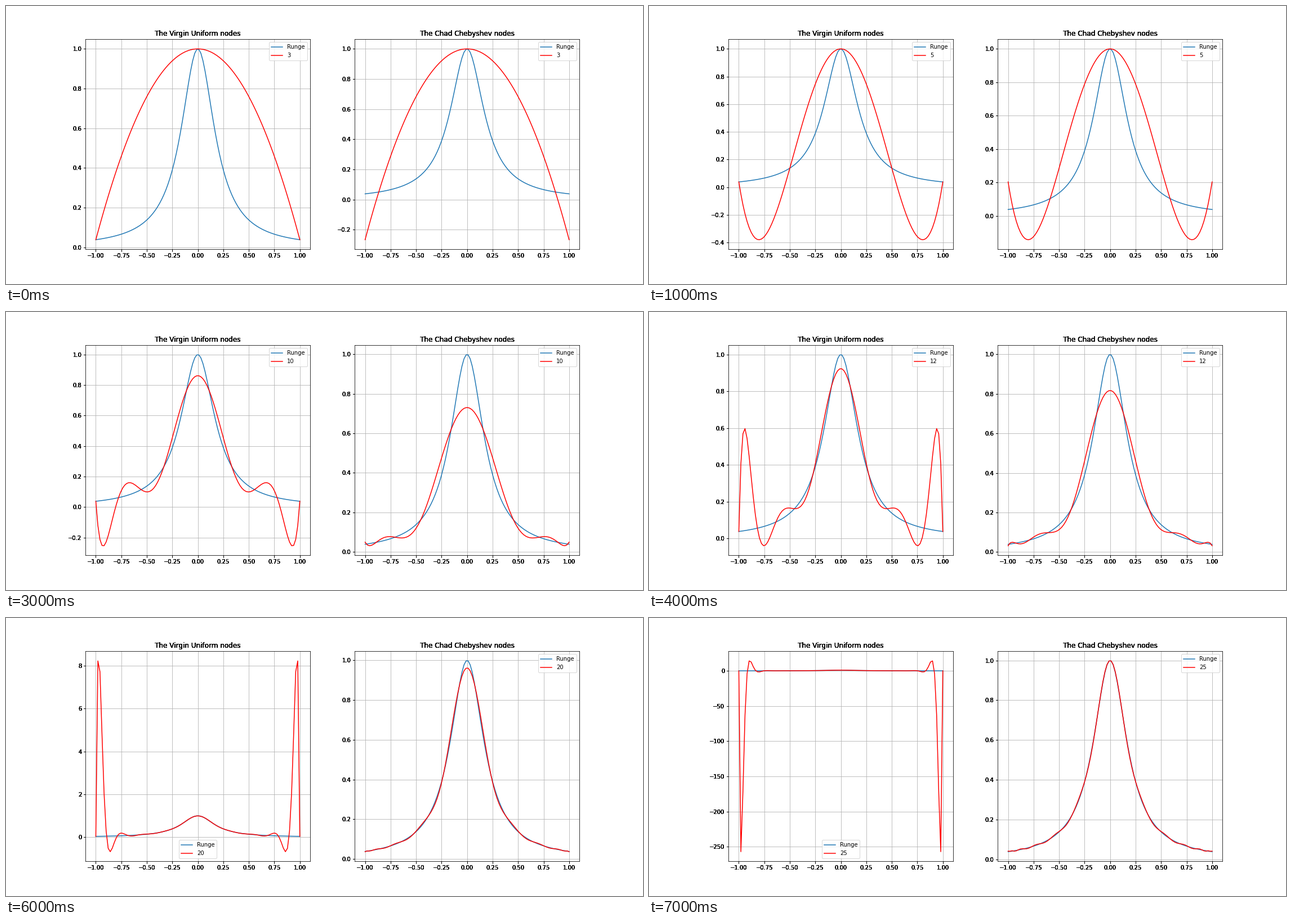
These frames come from a looping animation (1131x495 px, 8000 ms). A matplotlib script:

```python
import numpy as np
import matplotlib.pyplot as plt
from matplotlib.animation import FuncAnimation

W, H, DPI = 1131, 495, 72
COUNTS = [3, 5, 8, 10, 12, 15, 20, 25]
WEIGHT = 4  # extra passes that harden the edges of ticks, labels and titles

plt.rcParams.update({"font.family": "DejaVu Sans", "font.size": 10})


def runge(x):
    return 1 / (1 + 25 * x**2)


def uniform(n):
    return np.linspace(-1, 1, n)


def chebyshev(n):
    return np.cos((2 * np.arange(n) + 1) * np.pi / (2 * n))


def lagrange(nodes, x):
    total = np.zeros_like(x)
    for i, node in enumerate(nodes):
        rest = np.delete(nodes, i)
        basis = np.prod((x[:, None] - rest) / (node - rest), axis=1)
        total += runge(node) * basis
    return total


xs = np.linspace(-1, 1, 100)
fig = plt.figure(figsize=((W + 0.001) / DPI, (H + 0.001) / DPI), dpi=DPI,
                 facecolor="white")
fig.subplots_adjust(left=0.125, right=0.9, bottom=0.125, top=0.88, wspace=0.2)


def make_panel(col, title, nodes):
    ax = fig.add_subplot(1, 2, col, zorder=1)
    under = [fig.add_subplot(1, 2, col, frame_on=False) for _ in range(WEIGHT)]
    return ax, under, title, nodes


panels = [
    make_panel(1, "The Virgin Uniform nodes", uniform),
    make_panel(2, "The Chad Chebyshev nodes", chebyshev),
]


def draw(frame):
    n = COUNTS[frame]
    for ax, under, title, nodes in panels:
        ax.clear()
        ax.plot(xs, runge(xs), label="Runge")
        ax.plot(xs, lagrange(nodes(n), xs), "r", label=str(n))
        ax.set_title(title)
        ax.grid(True)
        ax.legend(loc="best")
        for copy in under:
            copy.set(xlim=ax.get_xlim(), ylim=ax.get_ylim(), title=title)
    return []


anim = FuncAnimation(fig, draw, frames=len(COUNTS), init_func=lambda: draw(0),
                     interval=1000, repeat=True, repeat_delay=0, blit=False)
plt.show()
```
